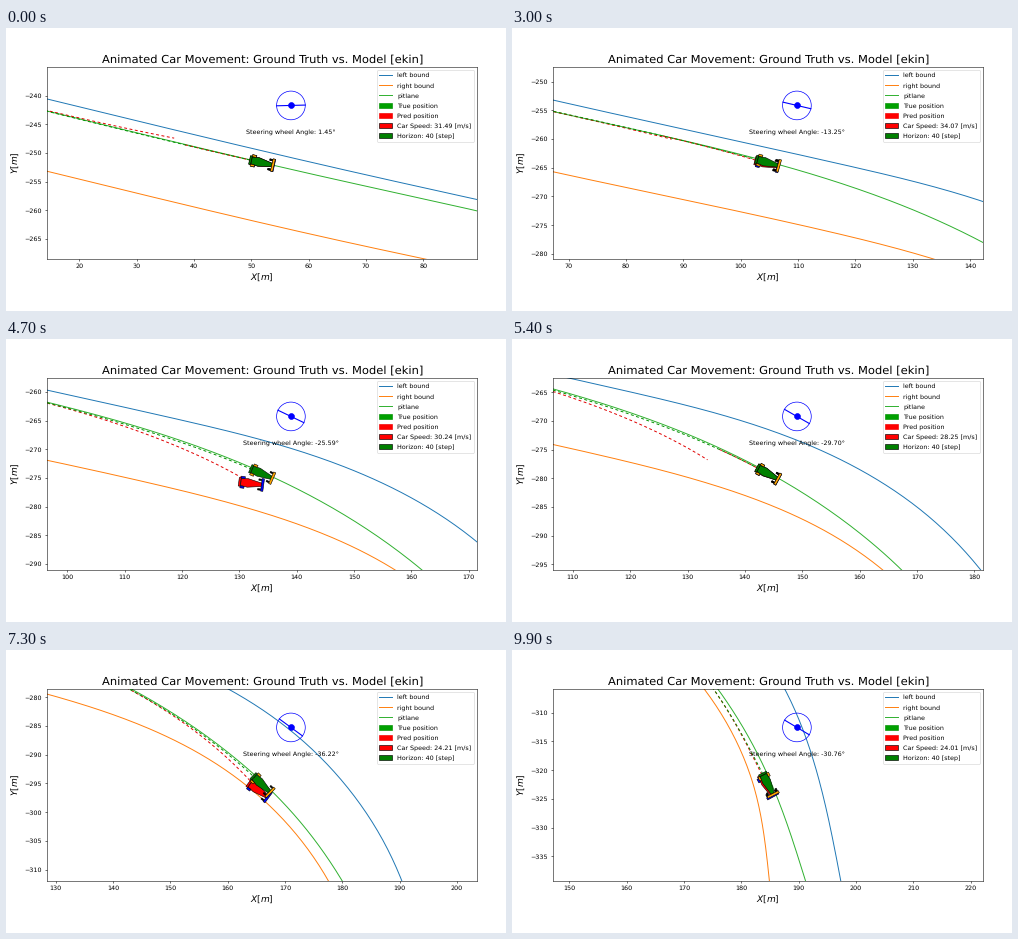
A matplotlib script for the animation above (10 s loop, 500 by 283 pixels).

```python
import numpy as np
import matplotlib.pyplot as plt
from matplotlib.animation import FuncAnimation
from matplotlib.patches import Circle, Patch, Polygon
from matplotlib.ticker import MultipleLocator
from matplotlib.transforms import Affine2D

plt.rcParams.update({"font.family": "DejaVu Sans", "font.size": 9.2,
                     "text.hinting": "none", "lines.linewidth": 1.4,
                     "axes.linewidth": 0.75, "patch.linewidth": 0.9})

HALF_W, HALF_H = 37.5, 16.7
HORIZON = 28          # frames between two resets of the prediction
FIRST_RESET = -36
START = -24           # beginning of the visible history

LEFT = [(14.4, -240.6), (67.3, -253.2), (118.5, -264.6), (142.3, -270.9),
        (171.5, -286.2), (187.6, -305.9), (197.35, -339.3)]
RIGHT = [(14.4, -253.2), (67.3, -265.7), (115.5, -276.15), (133.3, -280.8),
         (157.1, -291), (169.8, -301.4), (182.2, -322.9), (184.9, -339.3)]
PITLANE = [(14.4, -242.7), (67.3, -255.2), (96.5, -261.8), (142.3, -278.05),
           (161.8, -291), (172.4, -301.4), (185.5, -322.9), (191.2, -339.3)]

# step: car x, car y, speed, steering angle
DRIVE = {-24: (11.4, -242.0, 29.0, 4.0),
         0: (51.92, -251.72, 31.49, 1.45),
         17: (81.05, -258.2, 33.38, -4.48),
         30: (104.8, -264.13, 34.07, -13.25),
         47: (134.0, -274.28, 30.24, -25.59),
         61: (152.98, -284.65, 26.48, -32.95),
         84: (175.4, -306.2, 23.33, -35.97),
         99: (184.7, -322.55, 24.01, -30.76)}

# prediction error at the end of each horizon: metres ahead, metres to the right
DRIFT = [(-2.1, -0.7), (1.6, 0.2), (-1.1, 2.5), (0.4, 1.5), (0.3, 0.4)]


def natural_spline(knots, values):
    """Natural cubic spline through the values, linear beyond its ends."""
    knots, values = np.array(knots, float), np.array(values, float)
    n, scale = len(knots), np.ptp(knots)

    def cubes(t):
        return np.abs(np.subtract.outer(t, knots) / scale) ** 3

    line = np.c_[np.ones(n), knots / scale]
    system = np.block([[cubes(knots), line], [line.T, np.zeros((2, 2))]])
    weights = np.linalg.solve(system, np.r_[values, np.zeros((2, values.shape[1]))])

    def evaluate(t):
        t = np.asarray(t, float)
        basis = np.concatenate([cubes(t), np.ones(t.shape + (1,)), t[..., None] / scale], -1)
        return (basis @ weights).T

    return evaluate


def curve(points):
    steps = np.hypot(*np.diff(points, axis=0).T)
    length = np.r_[0, np.cumsum(steps)]
    return natural_spline(length, points)(np.linspace(-10, length[-1] + 7, 400))


state = natural_spline(list(DRIVE), list(DRIVE.values()))


def true_pose(t):
    x, y = state(t)[:2]
    dx, dy = (state(t + 0.5) - state(t - 0.5))[:2]
    return x, y, np.arctan2(dy, dx)


def pred_pose(t, segment):
    grow = ((t - FIRST_RESET - segment * HORIZON) / HORIZON) ** 2.5
    ahead, right = DRIFT[segment]
    x, y, heading = true_pose(t)
    c, s = np.cos(heading), np.sin(heading)
    return (x + grow * (ahead * c + right * s), y + grow * (ahead * s - right * c),
            heading + np.radians(7 * right) * grow)


def segment_of(t):
    return int((t - FIRST_RESET) // HORIZON)


def pred_trace(step):
    xs, ys = [], []
    for k in range(segment_of(step) + 1):
        begin = FIRST_RESET + k * HORIZON
        t = np.arange(max(begin, START), min(begin + HORIZON, step) + 0.01, 0.25)
        x, y, _ = pred_pose(t, k)
        xs += [*x, np.nan]
        ys += [*y, np.nan]
    return xs, ys


def step_at(frame):
    """The recording stalls twice and then catches up."""
    if 9 < frame < 17:
        return 9
    return 71 if frame == 72 else frame


def box(x, y, w, h):
    return [(x - w / 2, y - h / 2), (x + w / 2, y - h / 2),
            (x + w / 2, y + h / 2), (x - w / 2, y + h / 2)]


class Car:
    def __init__(self, color, wheel_color, z):
        body = [(-1.9, -0.6), (-0.7, -0.75), (1.7, -0.3),
                (1.7, 0.3), (-0.7, 0.75), (-1.9, 0.6)]
        parts = [(box(-2.1, 0, 0.35, 1.5), color), (body, color)]
        parts += [(box(-1.6, s * 0.85, 0.7, 0.35), wheel_color) for s in (-1, 1)]
        parts += [(box(1.4, s * 0.85, 0.5, 0.25), "black") for s in (-1, 1)]
        parts += [(box(1.9, 0, 0.4, 2.2), wheel_color)]
        self.parts = [ax.add_patch(Polygon(p, fc=c, ec="black", lw=0.8, zorder=z))
                      for p, c in parts]

    def place(self, x, y, heading):
        move = Affine2D().rotate(heading).translate(x, y) + ax.transData
        for part in self.parts:
            part.set_transform(move)


fig, ax = plt.subplots(figsize=(10, 5.66), dpi=50)
fig.subplots_adjust(left=41.2 / 500, right=471.3 / 500, bottom=52.4 / 283, top=244 / 283)
ax.set_title("Animated Car Movement: Ground Truth vs. Model [ekin]", fontsize=16.5)
ax.set_xlabel("$X[m]$", fontsize=12.9)
ax.set_ylabel("$Y[m]$", fontsize=12.9)
ax.xaxis.set_major_locator(MultipleLocator(10))
ax.yaxis.set_major_locator(MultipleLocator(5))

bounds = [ax.plot(*curve(points), label=label)[0] for points, label in
          ((LEFT, "left bound"), (RIGHT, "right bound"), (PITLANE, "pitlane"))]
bounds[2].set_color("#2fb02f")
dashed = (0, (3, 2.6))
pred_line, = ax.plot([], [], ls=dashed, color="#e00000", zorder=2.5)
true_line, = ax.plot([], [], ls=dashed, color="#009000", zorder=2.6)
pred_car = Car("red", "blue", 3)
true_car = Car("green", "orange", 4)

rim = ax.add_patch(Circle((0, 0), 2.5, fill=False, ec="blue", lw=1, zorder=3))
spoke, = ax.plot([], [], color="blue", lw=1.6)
hub, = ax.plot([], [], "o", color="blue", ms=8.5, mew=0.9)
angle_text = ax.text(0, 0, "", ha="center", va="baseline")

handles = bounds + [
    Patch(fc="#00a000", ec="#009000", label="True position"),
    Patch(fc="red", ec="#f00000", label="Pred position"),
    Patch(fc="red", ec="black", label="Car Speed: 31.49 [m/s]"),
    Patch(fc="green", ec="black", label="Horizon: 40 [step]")]
legend = ax.legend(handles=handles, loc="upper right", labelspacing=0.67)
legend.set_zorder(6)
speed_text = legend.get_texts()[5]


def update(frame):
    step = step_at(frame)
    x, y, heading = true_pose(step)
    speed, angle = state(step)[2:]
    ax.set_xlim(x - HALF_W, x + HALF_W)
    ax.set_ylim(y - HALF_H, y + HALF_H)
    true_car.place(x, y, heading)
    pred_car.place(*pred_pose(step, segment_of(step)))

    true_line.set_data(*state(np.arange(START, step + 0.01, 0.25))[:2])
    pred_line.set_data(*pred_trace(step))

    cx, cy = x + 5, y + 10
    dx, dy = 2.5 * np.cos(np.radians(angle)), 2.5 * np.sin(np.radians(angle))
    rim.center = cx, cy
    spoke.set_data([cx - dx, cx + dx], [cy - dy, cy + dy])
    hub.set_data([cx], [cy])
    angle_text.set_position((cx, y + 5))
    angle_text.set_text(f"Steering wheel Angle: {angle:.2f}°")
    speed_text.set_text(f"Car Speed: {speed:.2f} [m/s]")
    return []


anim = FuncAnimation(fig, update, frames=100, interval=100, repeat=True, repeat_delay=0)
plt.show()
```
